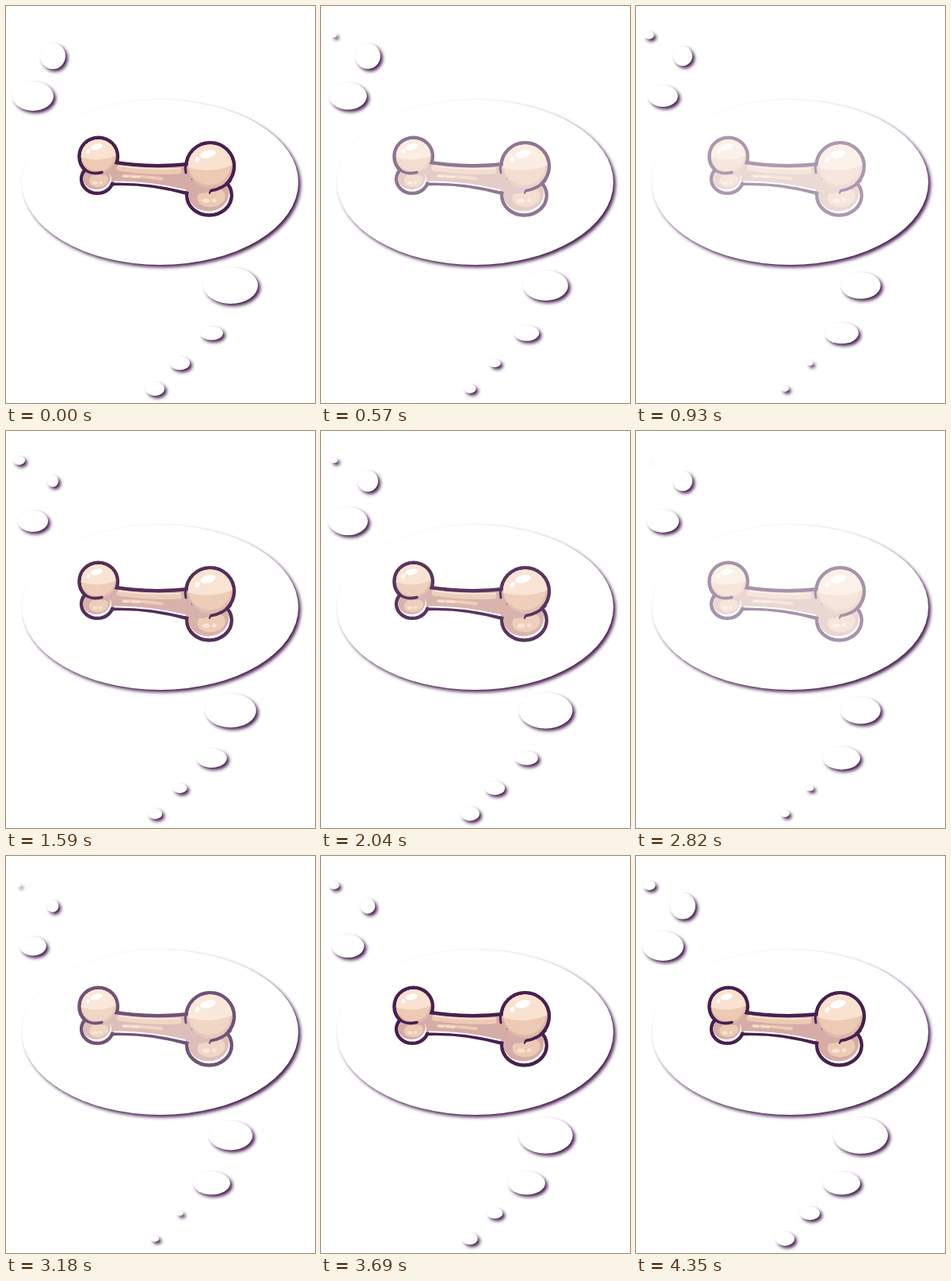
Recreate the animation shown at these times as an HTML page with a canvas. Size 390 px wide and 500 px high, loop 9 s.

```html
<!DOCTYPE html>
<html lang="en">
<head>
<meta charset="utf-8">
<title>Thought bubble</title>
<style>
html, body { margin: 0; width: 100%; height: 100%; overflow: hidden; background: #fff; }
canvas { display: block; }
</style>
</head>
<body>
<canvas id="stage" width="390" height="500"></canvas>
<script>
const W = 390, H = 500, LOOP = 9000, STEP = 30, REST = 4350;
const INK = '#47204f', SHADE = '#d5aca6', PEACH = '#eccab4', LIGHT = '#f9e2d0';
const ctx = document.getElementById('stage').getContext('2d');

// low: smallest scale, dur: one swing, runs: swings before resting at full size
const bubbles = [
  { x: 16.5, y: 37, rx: 8, ry: 6, low: 0.06, dur: 1365, delay: 0, runs: 3, grow: true },
  { x: 59, y: 63, rx: 16, ry: 16.5, low: 0.42, dur: 950, delay: 500, runs: 4 },
  { x: 34, y: 113.5, rx: 26, ry: 18.5, low: 0.64, dur: 1000, delay: 250, runs: 4 },
  { x: 283.5, y: 352, rx: 34.5, ry: 23, low: 0.73, dur: 950, delay: 0, runs: 4 },
  { x: 259.5, y: 412, rx: 23.5, ry: 14.5, low: 0.61, dur: 840, delay: 350, runs: 3, grow: true },
  { x: 219.5, y: 450, rx: 12.5, ry: 8.5, low: 0.3, dur: 1015, delay: 0, runs: 4 },
  { x: 188, y: 482, rx: 12, ry: 9, low: 0.4, dur: 1015, delay: 0, runs: 4 }
];
const fade = { low: 0.45, dur: 895, delay: 0, runs: 4 };

function swing(a, t) {
  const p = Math.min(Math.max((t - a.delay) / a.dur, 0), a.runs);
  const wave = (1 - Math.cos(Math.PI * p)) / 2;
  return a.low + (1 - a.low) * (a.grow ? wave : 1 - wave);
}

function oval(g, x, y, rx, ry, fill, tilt = 0) {
  g.beginPath();
  g.ellipse(x, y, rx, ry, tilt, 0, Math.PI * 2);
  g.fillStyle = fill;
  g.fill();
}

function line(g, width, color, x0, y0, cx, cy, x1, y1) {
  g.beginPath();
  g.moveTo(x0, y0);
  g.quadraticCurveTo(cx, cy, x1, y1);
  g.lineWidth = width;
  g.strokeStyle = color;
  g.stroke();
}

function ballPath(x, y, rx, ry) {
  const p = new Path2D();
  p.ellipse(x, y, rx, ry, 0, 0, Math.PI * 2);
  return p;
}

function ball(g, path, x, y, r) {
  g.save();
  g.clip(path);
  oval(g, x, y, r + 1, r + 1, '#dfb9aa');
  oval(g, x - r * 0.03, y - r * 0.1, r * 0.96, r * 0.94, PEACH);
  g.beginPath();
  g.moveTo(x - r, y - r);
  g.lineTo(x + r, y - r);
  g.lineTo(x + r, y - r * 0.05);
  g.quadraticCurveTo(x, y + r * 0.35, x - r, y + r * 0.05);
  g.fillStyle = LIGHT;
  g.fill();
  g.restore();
  oval(g, x - r * 0.1, y - r * 0.55, r * 0.36, r * 0.17, '#fff', -0.25);
  oval(g, x - r * 0.58, y - r * 0.3, r * 0.1, r * 0.13, '#fff', 0.4);
}

function lobe(g, path, x, y, rx, ry) {
  g.save();
  g.clip(path);
  oval(g, x, y, rx + 1, ry + 1, '#fff');
  oval(g, x - 1.2, y - 2.6, rx, ry, SHADE);
  oval(g, x + rx * 0.1, y + ry * 0.1, rx * 0.68, ry * 0.55, PEACH, -0.15);
  oval(g, x - rx * 0.16, y + ry * 0.3, rx * 0.2, ry * 0.12, LIGHT);
  oval(g, x + rx * 0.24, y + ry * 0.28, rx * 0.11, ry * 0.12, LIGHT);
  g.restore();
}

function makeBone() {
  const c = document.createElement('canvas');
  c.width = W;
  c.height = H;
  const g = c.getContext('2d');
  g.lineCap = g.lineJoin = 'round';

  const ballL = ballPath(116.7, 189.5, 22, 21.5);
  const ballR = ballPath(257.7, 202, 28, 27.5);
  const lobeL = ballPath(115.2, 218, 17.8, 15.6);
  const lobeR = ballPath(256.5, 238.5, 26, 22.7);
  const shaft = new Path2D('M130 198Q180 207 234 201V235Q180 219 128 222Z');
  const parts = [shaft, lobeL, lobeR, ballL, ballR];

  g.lineWidth = 9;
  g.strokeStyle = INK;
  parts.forEach(p => g.stroke(p));
  g.fillStyle = SHADE;
  parts.forEach(p => g.fill(p));

  line(g, 7, PEACH, 143, 204, 180, 210, 218, 208);
  line(g, 2, LIGHT, 143, 201.5, 180, 206.5, 220, 204.5);
  line(g, 4, PEACH, 148, 214, 170, 214, 196, 217.5);
  line(g, 2.4, LIGHT, 149, 214.5, 151, 214.5, 154, 214.7);
  line(g, 2.4, LIGHT, 159, 215, 163, 215, 168, 215.3);
  line(g, 2.2, '#fff', 137, 221.5, 180, 221, 226, 232);

  lobe(g, lobeL, 115.2, 218, 17.8, 15.6);
  lobe(g, lobeR, 256.5, 238.5, 26, 22.7);
  // soft shade below each ball
  oval(g, 122, 206, 15, 7, SHADE);
  oval(g, 246, 226, 17, 10, SHADE);
  ball(g, ballL, 116.7, 189.5, 22);
  ball(g, ballR, 257.7, 202, 28);

  line(g, 3.6, INK, 97, 203.5, 105, 213.5, 121, 209.5);
  line(g, 3.8, INK, 283, 220, 274, 230, 259, 232.5);
  line(g, 2.4, INK, 259, 232.5, 257.5, 233.5, 257, 235.5);
  line(g, 3, INK, 227, 199, 225.5, 204, 227, 210);
  line(g, 2.6, INK, 139, 198, 140, 196, 140.5, 193);
  return c;
}

const bone = makeBone();

function bubble(x, y, rx, ry) {
  ctx.save();
  ctx.shadowColor = INK;
  ctx.shadowBlur = 4.5;
  ctx.shadowOffsetX = ctx.shadowOffsetY = 3;
  oval(ctx, x, y, rx, ry, '#fff');
  ctx.restore();
}

function draw(t) {
  ctx.globalAlpha = 1;
  ctx.fillStyle = '#fff';
  ctx.fillRect(0, 0, W, H);
  bubble(194.5, 222, 174.5, 104);
  for (const b of bubbles) {
    const s = swing(b, t);
    bubble(b.x, b.y, b.rx * s, b.ry * s);
  }
  ctx.globalAlpha = swing(fade, t);
  ctx.drawImage(bone, 0, 0);
}

const start = performance.now();
function tick() {
  const t = (performance.now() - start) % LOOP;
  draw(Math.min(Math.floor(t / STEP) * STEP, REST));
  requestAnimationFrame(tick);
}
tick();
</script>
</body>
</html>
```
